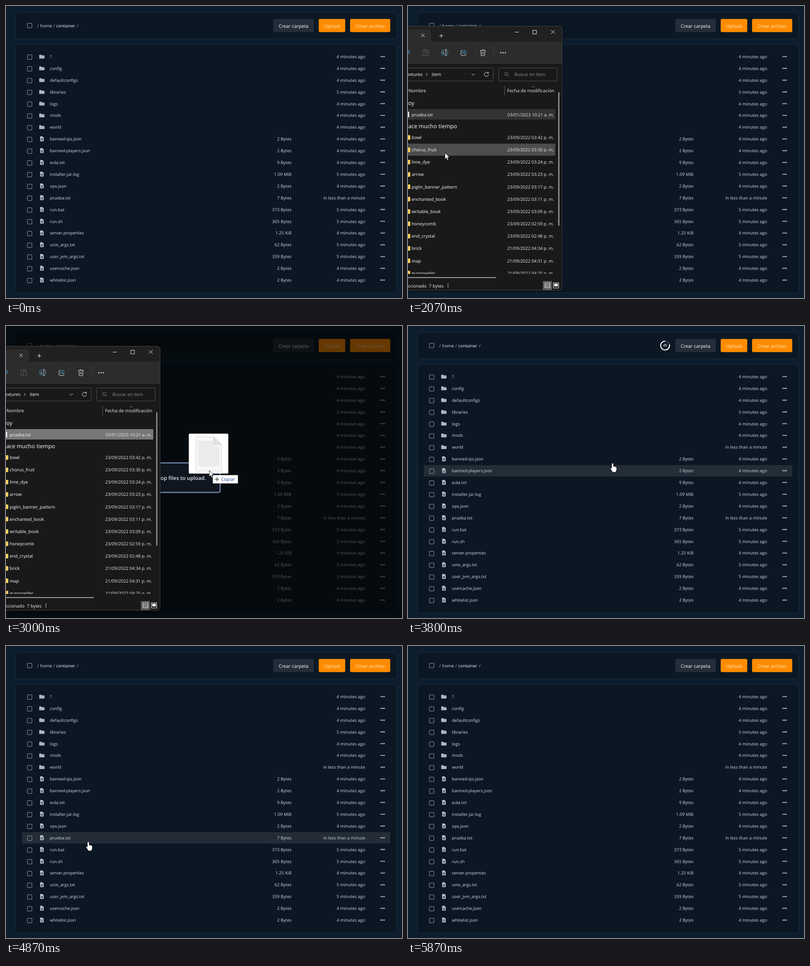
These frames come from a looping animation (871x643 px, 6.39 s). An HTML page:

```html
<!DOCTYPE html>
<html lang="es">
<head>
<meta charset="utf-8">
<title>File manager upload</title>
<style>
html, body { margin: 0; width: 100%; height: 100%; overflow: hidden; background: #0c1d2e; }
svg { display: block; }
text { font-family: "Open Sans", "Noto Sans", sans-serif; text-rendering: geometricPrecision; white-space: pre; }
.shadow { filter: drop-shadow(0 1px 3px rgba(0, 0, 0, .4)); }
</style>
</head>
<body>
<svg id="stage" width="871" height="643" viewBox="0 0 871 643"></svg>
<script>
const LOOP = 6390, STEP = 1000 / 15, HOVER_LAG = 2 * STEP;
const ROW_Y = 111.5, ROW_H = 25.9;
const LIST_Y = 289.5, LIST_H = 27.15;

const files = `?||4
config||4
defaultconfigs||4
libraries||5
logs||4
mods||4
world||4
banned-ips.json|2 Bytes|4
banned-players.json|2 Bytes|4
eula.txt|9 Bytes|4
installer.jar.log|1.09 MiB|5
ops.json|2 Bytes|4
prueba.txt|7 Bytes|0
run.bat|373 Bytes|5
run.sh|365 Bytes|5
server.properties|1.25 KiB|4
unix_args.txt|62 Bytes|5
user_jvm_args.txt|339 Bytes|5
usercache.json|2 Bytes|4
whitelist.json|2 Bytes|4`.split('\n').map(line => line.split('|'));

const folders = `bowl|23/09/2022 03:42
chorus_fruit|23/09/2022 03:30
lime_dye|23/09/2022 03:24
arrow|23/09/2022 03:23
piglin_banner_pattern|23/09/2022 03:17
enchanted_book|23/09/2022 03:11
writable_book|23/09/2022 03:09
honeycomb|23/09/2022 02:59
end_crystal|23/09/2022 02:48
brick|21/09/2022 04:34
map|21/09/2022 04:31
gunpowder|21/09/2022 04:25`.split('\n').map(line => line.split('|'));

const NOW = 'in less than a minute';
const ago = n => n > 0 ? n + ' minutes ago' : NOW;

// Drawing helpers
const text = (x, y, s, size, fill, more = '') =>
  `<text x="${x}" y="${y}" font-size="${size}" fill="${fill}" ${more}>${s}</text>`;
const rect = (x, y, w, h, fill, more = '') =>
  `<rect x="${x}" y="${y}" width="${w}" height="${h}" fill="${fill}" ${more}/>`;
const line = (d, stroke, width = 1, more = '') =>
  `<path d="${d}" fill="none" stroke="${stroke}" stroke-width="${width}" ${more}/>`;
const shape = (d, fill, more = '') => `<path d="${d}" fill="${fill}" ${more}/>`;
const END = 'text-anchor="end"', MID = 'text-anchor="middle"';

const box = y => rect(47, y - 5, 10, 10, 'none', 'stroke="#93a0ac" rx="1"');
const dots = (x, y, gap, r, fill) => [-gap, 0, gap]
  .map(d => `<circle cx="${x + d}" cy="${y}" r="${r}" fill="${fill}"/>`).join('');
const panel = (y, h) => rect(20.5, y, 839, h, '#0b1824', 'rx="6" stroke="#1c2d3d"');
const button = (x, w, label, bg, fg) =>
  rect(x - .2, 28.6, w + .4, 28.8, bg, 'rx="3"') + text(x + w / 2, 48, label, 10.4, fg, MID);

function fileRow([name, size, age], i) {
  const y = ROW_Y + i * ROW_H;
  const icon = i < 7
    ? shape(`M73 ${y - 3}q0-1.3 1.3-1.3h3l1.6 1.6h4.5q1.3 0 1.3 1.3v4.4q0 1.2-1.3 1.2h-9.1q-1.3 0-1.3-1.2z`, '#a9b7c4')
    : shape(`M75 ${y - 4.5}q0-1.2 1.2-1.2h3.8l3 3v6.6q0 1.2-1.2 1.2h-5.6q-1.2 0-1.2-1.2z`, '#b3c0cc') +
      line(`M76.7 ${y - .2}h4.6m-4.6 2.6h4.6`, '#0b1824', 1.2);
  return box(y + 1) + icon +
    text(96.5, y + 3.4, name, 9.35, '#cfdbe7') +
    text(628, y + 3.4, size, 9.45, '#cbd7e4', END) +
    text(790, y + 3.4, ago(age), 9.5, '#cbd7e4', END + ` id="age${i}"`) +
    dots(828.5, y, 3.4, 1.35, '#c3ced8');
}

function page() {
  return rect(0, 0, 871, 643, '#0c1d2e') + panel(14.5, 58) + panel(84, 548) +
    rect(35, 0, 810, 25, '#232c37', 'id="hover"') +
    box(43) +
    text(68.5, 46.5, '/', 9.5, '#a9b7c5') + text(75.3, 46.5, 'home', 9.5, '#d3dee8') +
    text(104, 46.5, '/', 9.5, '#a9b7c5') + text(110.5, 46.5, 'container', 9.45, '#f0f5fa') +
    text(156, 46.5, '/', 9.5, '#a9b7c5') +
    button(588, 89, 'Crear carpeta', '#242d39', '#fff') +
    button(688, 58, 'Upload', '#ff8c00', '#ffe6c4') +
    button(757, 88, 'Crear archivo', '#ff8c00', '#ffe6c4') +
    `<g id="spinner" transform="translate(565.5 43)">
      <circle r="9.8" fill="none" stroke="#3d4752" stroke-width="2"/>
      <path d="M0-9.8A9.8 9.8 0 1 0 9.5-2.4" fill="none" stroke="#fff" stroke-width="2"/>
      <path d="M-2.6 2.2a2.1 2.1 0 0 1-.4-4a3.1 3.1 0 0 1 5.8-.4a2.3 2.3 0 0 1 .1 4.4z" fill="#7d8893"/>
      <path d="M0 4V-1M-1.7 .7L0-1L1.7 .7" fill="none" stroke="#2a3540" stroke-width=".9"/>
    </g>` +
    files.map(fileRow).join('');
}

function overlay() {
  return rect(0, 0, 871, 643, '#000', 'opacity=".6"') +
    rect(249, 301.5, 222, 65, '#10161f', 'rx="4" stroke="#6f88a8" stroke-width="2.4"') +
    text(440, 339, 'Drag and drop files to upload.', 11.6, '#dfe5ec', END + ' font-weight="600"');
}

function toolbar() {
  const w = '#dcdcdc', b = '#43a4d8';
  return line('M-3 98a4 4 0 1 1 0 7', b, 1.2) +
    line('M36 97h-3.5v12h4M41 97h3v3M36 98.5v-2.5h5v2.5zM38 101.5h7v8h-7z', '#566069') +
    line('M82 97.5h-6q-2 0-2 2v6q0 2 2 2h6M85 97.5q2.500 0 2.500 2v6q0 2-2.500 2', b) +
    line('M83.5 96v13M82 95.5h3M82 109.500h3', w) +
    text(75.5, 105.6, 'A', 8, w) +
    line('M121 98h-2.500q-2 0-2 2v7q0 2 2 2h7q2 0 2-2v-1.500', w) +
    line('M119.5 105q.8-5 5-5v-3.3l4.3 4.6l-4.3 4.5v-3.2q-3 0-5 2.4z', b, 1, 'stroke-linejoin="round"') +
    line('M158.5 98h12.5M162.5 98q0-2 2.2-2t2.2 2M160 98l1 11.5h7.5l1-11.5M163.3 101v5.5M166.2 101v5.5', w) +
    line('M188.5 90v26', '#3f3f3f') + dots(209, 103, 5, 1.4, w);
}

function folderRow([name, date], i) {
  const y = LIST_Y + i * LIST_H;
  return rect(-6, y - 5, 11, 10, '#ffcf5c', 'rx="1"') +
    text(8, y + 3.5, name, 9.75, '#fff') +
    text(321, y + 3.5, date + ' p. m.', 9.6, '#ececec', END);
}

function explorer() {
  const w = '#eee', field = 'rx="1" stroke="#505050"';
  return rect(-20, 44.5, 359, 582, '#191919', 'rx="7" class="shadow"') +
    shape('M-5 45H332q7 0 7 7V79H-5z', '#202020') +
    shape('M-5 52H45q5.5 0 5.5 5.5V79H-5z', '#2c2c2c') +
    rect(-5, 79, 344, 47.5, '#2c2c2c') + line('M-5 126.5H339', '#3c3c3c') +
    line('M29.3 61l7.4 7.4m0-7.4l-7.4 7.4M69 65.5h8.5m-4.25-4.25v8.5M235 57.5h8.5M274.5 53.5h8v8h-8zM314.5 53l8.5 8.5m0-8.5l-8.5 8.5', w) +
    toolbar() +
    rect(-20, 136.5, 207.5, 28.5, '#191919', field) + rect(199.5, 136.5, 128.5, 28.5, '#191919', field) +
    text(32, 154, 'textures', 9.9, '#fff', END) + text(52, 154, 'item', 9.9, '#fff') +
    line('M40 148l2.6 2.7l-2.6 2.7M140 149l3.5 3.5l3.5-3.5', w) +
    line('M176 147.3a4.6 4.6 0 1 0 1.2 3.5M176.8 145v3h-3', w) +
    `<circle cx="216" cy="149.5" r="3.5" fill="none" stroke="#858585"/>` + line('M218.5 152.2l3 3', '#858585') +
    text(234, 154, 'Buscar en item', 9.7, '#8d8d8d') +
    text(1, 190, 'Nombre', 10, '#f0f0f0') + text(218, 190, 'Fecha de modificación', 10, '#f0f0f0') +
    line('M212.5 176v21', '#5c5c5c') + line('M272.5 179l3-2.5l3 2.5', '#9a9a9a') +
    text(14, 218, 'Hoy', 12.4, '#fff', END) +
    rect(-5, 227, 329, 23, '#333', 'id="selected"') +
    rect(-5, 233, 7.5, 12, '#f2f2f2') +
    text(8, 242.5, 'prueba.txt', 9.6, '#fff') +
    text(321, 242.5, '03/01/2023 10:21 a. m.', 9.6, '#ececec', END) +
    text(108, 269, 'Hace mucho tiempo', 12.4, '#fff', END) +
    `<clipPath id="list"><rect y="270" width="339" height="320"/></clipPath><g clip-path="url(#list)">` +
    rect(0, 0, 324, 26.5, '#4d4d4d', 'id="listHover"') + folders.map(folderRow).join('') + '</g>' +
    rect(330.5, 190, 2.5, 294, '#9c9c9c', 'rx="1"') + rect(-5, 597, 198.5, 2, '#9c9c9c', 'rx="1"') +
    text(41, 619.5, '1 elemento seleccionado', 9.8, '#f2f2f2', END) + text(46, 619.5, '7 bytes', 9.8, '#f2f2f2') +
    line('M88 610.5v10', '#d0d0d0') +
    rect(297.5, 606.5, 18, 18, '#4a4a4a', 'stroke="#8c8c8c"') +
    line('M301 609.5h11.5v11.5h-11.5zM301 612.5h11.5m-11.5 3h11.5m-11.5 3h11.5', w) +
    rect(319.5, 609.5, 12, 11.5, '#191919', 'stroke="#eee"') + rect(321.5, 611.5, 8, 6, '#fff') +
    line('M-5 44.5H332q7 0 7 7V619q0 7-7 7H-5', '#444');
}

function dragged() {
  const rows = Array.from({ length: 19 }, (_, i) => `M-24 ${i * 3 - 64}H${i < 4 ? 8 : 22}`).join('');
  return rect(-45, -81, 87, 88, '#fff', 'rx="2.5"') +
    shape('M-29-74H10L27-57V1H-29z', '#f8f8f8', 'stroke="#d3d3d3"') +
    line(rows, '#d2d2d2') + shape('M10-74V-57H27z', '#e3e3e3', 'stroke="#c6c6c6"') +
    '<g id="copy">' + rect(8, 10.5, 55, 18, '#fff', 'rx="1" stroke="#bbb" stroke-width=".6"') +
    line('M12.5 19.5h9m-4.5-4.5v9', '#222', 1.2) +
    text(26, 23, 'Copiar', 10, '#1a3f9c') + '</g>';
}

const group = (id, body) => `<g id="${id}">${body}</g>`;
const outline = 'stroke="#000" stroke-width=".8" stroke-linejoin="round"';
document.getElementById('stage').innerHTML =
  group('page', page()) + group('overlay', overlay()) + group('explorer', explorer()) +
  group('drag', dragged()) +
  group('arrow', shape('M0 0V14L3.2 11L5.4 16.2L7.8 15.2L5.6 10.2H10Z', '#fff', outline)) +
  group('hand', shape('M-2 2Q-2 0 0 0T2 2V7L7 8Q9 8.5 9 10.5V14Q9 16 7.5 18V20H-1V18L-4.5 13Q-5.5 11-4 10.5Q-3 10.2-2 11.5Z', '#fff', outline));

const $ = id => document.getElementById(id);
const show = (id, on) => $(id).style.display = on ? '' : 'none';
const move = (id, x, y) => $(id).setAttribute('transform', `translate(${x.toFixed(1)} ${y.toFixed(1)})`);
const ramp = (t, a, b) => Math.min(1, Math.max(0, (t - a) / (b - a)));

// Pointer track: time, x, y
const track = [
  [0, 58, 641], [70, 58, 660], [1530, 58, 660], [1600, 60, 632], [2130, 84, 284],
  [2200, 81, 262], [2330, 78, 244], [2470, 77, 243], [2670, 77, 243], [2730, 136, 258],
  [2870, 300, 288], [3000, 447, 318], [3330, 450, 316], [3670, 450, 316], [3800, 450, 302], [4070, 449, 304],
  [4270, 340, 420], [4470, 170, 562], [4670, 118, 436], [4730, 110, 428], [4870, 181, 431],
  [5000, 128, 425], [5130, 72, 429], [5330, 124, 424], [5400, 128, 430], [5800, 150, 609], [LOOP, 150, 680]
];

function pointer(t) {
  const i = Math.max(1, track.findIndex(k => k[0] > t));
  const [t0, x0, y0] = track[i - 1], [t1, x1, y1] = track[i];
  const p = (t - t0) / (t1 - t0);
  return [x0 + (x1 - x0) * p, y0 + (y1 - y0) * p];
}

function draw(ms) {
  const t = Math.round(Math.floor((ms + 5) / STEP) * STEP / 10) * 10;
  const [x, y] = pointer(t);
  const dropped = t >= 3400, gone = t >= 5870;

  show('explorer', t >= 1530 && !dropped);
  $('selected').setAttribute('fill', t >= 2730 ? '#777' : '#333');
  const item = Math.floor((y - 276) / LIST_H);
  show('listHover', t >= 1600 && t < 2730 && item >= 0 && item < folders.length);
  $('listHover').setAttribute('y', 276 + item * LIST_H);

  $('overlay').style.opacity = dropped ? 1 - ramp(t, 3330, 3530) : ramp(t, 2800, 3000);

  show('drag', t > 2730 && !dropped);
  move('drag', x, y);
  show('copy', x > 339);
  show('arrow', t < 70 || t >= 1600 && !dropped);
  move('arrow', x, y);
  show('hand', dropped && !gone);
  move('hand', x, y);

  // The page highlights rows a little behind the pointer
  const hoverY = pointer(Math.max(0, t - HOVER_LAG))[1];
  const row = Math.floor((hoverY - ROW_Y + 12.5) / ROW_H);
  show('hover', t >= 3530 && !gone && row >= 0 && row < files.length);
  $('hover').setAttribute('y', (ROW_Y + row * ROW_H - 12.4).toFixed(1));

  show('spinner', t >= 3530 && t < 4200);
  $('age6').textContent = t >= 3670 ? NOW : ago(4);
}

function tick() {
  draw(performance.now() % LOOP);
  requestAnimationFrame(tick);
}
tick();
</script>
</body>
</html>
```
